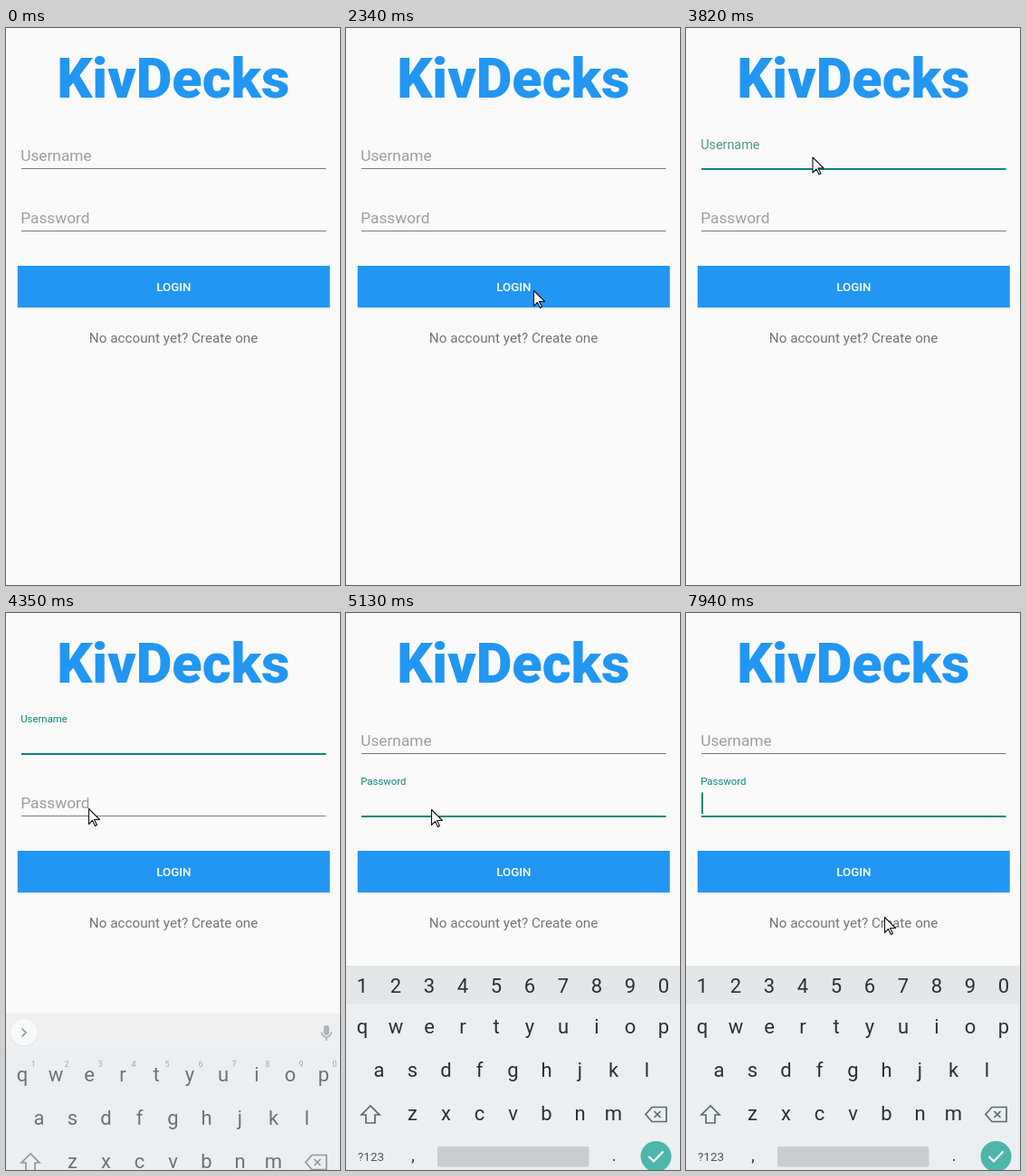
An HTML page for the animation above (8000 ms loop, 369x616 px).

```html
<!DOCTYPE html>
<html lang="en">
<head>
<meta charset="utf-8">
<title>Login screen</title>
<style>
  html, body { margin: 0; height: 100%; overflow: hidden; background: #fafafa; }
  svg { display: block; width: 100%; height: 100%; font-family: Roboto, Arial, sans-serif; }
  .mid { text-anchor: middle; }
  .key { font-size: 22px; fill: #263238; }
  .sup { font-size: 9px; fill: #78868d; }
  .mark { font-size: 18px; fill: #263238; }
  .icon { fill: none; stroke: #5a6a72; stroke-width: 1.7; }
  .mic { stroke: #8b9398; }
</style>
</head>
<body>
<svg viewBox="0 0 369 616">
  <rect width="369" height="616" fill="#fafafa"/>
  <text class="mid" x="184.8" y="77" font-size="61.2" font-weight="900" fill="#2196f3">KivDecks</text>
  <g id="fields"></g>
  <rect x="13" y="264" width="345" height="46.5" fill="#dfe3e6"/>
  <rect x="12.8" y="263" width="344.9" height="46" fill="#2196f3"/>
  <text class="mid" x="185.3" y="291" font-size="13.3" font-weight="500" fill="#fff">LOGIN</text>
  <text class="mid" x="185.1" y="348" font-size="15.25" fill="#757575">No account yet? Create one</text>

  <g id="keyboard">
    <rect y="390" width="369" height="226" fill="#eceff1"/>
    <g id="keys">
      <g id="textKeys">
        <rect y="390" width="369" height="42" fill="#eeeff1"/>
        <circle cx="20" cy="412" r="15" fill="#dfe2e4"/>
        <circle cx="20" cy="411" r="14.5" fill="#fff"/>
        <path class="icon" d="M17.5 406.5l4.5 4.5l-4.5 4.5"/>
        <rect x="351" y="403" width="6" height="11" rx="3" fill="#8b9398"/>
        <path class="icon mic" d="M348.5 410.5a5.5 5.5 0 0 0 11 0M354 416v4"/>
      </g>
      <g id="digitKeys">
        <rect y="390" width="369" height="42" fill="#e3e7e9"/>
      </g>
      <g id="letters"></g>
      <path class="icon" d="M27 545l-10 10h5v9h10v-9h5z"/>
      <path class="icon" d="M338 546.5h16v16h-16l-7 -8zM340.5 551l7 7m0 -7l-7 7"/>
      <text class="mid" x="27.5" y="606" font-size="13.5" fill="#455a64">?123</text>
      <text class="mid mark" x="74" y="606">,</text>
      <text class="mid mark" x="296" y="606">.</text>
    </g>
    <rect x="101" y="590" width="167.5" height="22.5" rx="2" fill="#c9cdd0"/>
    <circle cx="342.5" cy="601" r="17" fill="#4db6ac"/>
    <path id="action" fill="none" stroke="#fff" stroke-width="2.2"/>
  </g>

  <rect id="caret" x="17" y="198.5" width="2" height="23.5" fill="#0a8778"/>
  <path id="cursor" d="M0 0v17l4 -4l3 6l2 -1l-3 -6h6z"
        fill="#fff" stroke="#111" stroke-width="1.1" stroke-linejoin="round"/>
</svg>
<script>
const LOOP = 8000, STEP = 77;
const TEAL = '#0a8778';
const $ = id => document.getElementById(id);

function set(el, attrs) {
  for (const name in attrs) el.setAttribute(name, attrs[name]);
}
function add(parent, tag, attrs, text = '') {
  const el = document.createElementNS('http://www.w3.org/2000/svg', tag);
  set(el, attrs);
  el.textContent = text;
  return parent.appendChild(el);
}
const show = (el, on) => { el.style.display = on ? '' : 'none'; };

function progress(t, start, end) {
  if (t < start) return 0;
  if (t >= end) return 1;
  return Math.floor((t - start) / STEP) * STEP / (end - start);
}
const smooth = p => p * p * (3 - 2 * p);

// Pointer moves: start, end, destination
const moves = [
  [1320, 1710, 207.5, 290.5],
  [2340, 2570, 149, 191],
  [2570, 2840, 214, 325],
  [2840, 3030, 192.5, 333.5],
  [3030, 3330, 140, 143],
  [3820, 4200, 91.5, 216.5],
  [4750, 4980, 94.5, 217.5],
  [5130, 5750, 215.5, 333.5],
  [6140, 6370, 219.5, 336.5]
];

function pointerAt(t) {
  let x = 304, y = 554;
  for (const [start, end, toX, toY] of moves) {
    const p = smooth(progress(t, start, end));
    x += (toX - x) * p;
    y += (toY - y) * p;
  }
  return `${x} ${y}`;
}

function makeField(label, top) {
  return {
    top,
    hint: add($('fields'), 'text', { x: 16.2 }, label),
    line: add($('fields'), 'rect', { x: 17, width: 336.5 })
  };
}

function drawField({ top, hint, line }, lift, focused) {
  set(hint, { y: top - 8 - 26.2 * lift, 'font-size': 17.3 - 5.9 * lift });
  hint.style.fill = `color-mix(in srgb, ${TEAL} ${lift * 100}%, #9e9e9e)`;
  set(line, { y: top, height: focused ? 2 : 1, fill: focused ? TEAL : '#7b7b7b' });
}

function makeRow(parent, chars, x, y, cls = 'key') {
  [...chars].forEach((c, i) => add(parent, 'text', { class: 'mid ' + cls, x: x + 37 * i, y }, c));
}
['qwertyuiop', 'asdfghjkl', 'zxcvbnm'].forEach((row, i) =>
  makeRow($('letters'), row, 18 + 18.5 * i * (i + 1) / 2, 465 + 48 * i));
makeRow($('digitKeys'), '1234567890', 18, 420);
makeRow($('textKeys'), '1234567890', 30, 449, 'sup');

const user = makeField('Username', 155);
const pass = makeField('Password', 224);

function draw(t) {
  const swap = progress(t, 4750 - STEP, 4980);
  const userLift = 0.25 * progress(t, 3500 - STEP, 3570) + 0.75 * progress(t, 3820 - STEP, 3980);
  const passLift = 0.2 * progress(t, 4350, 4580);
  drawField(user, userLift * (1 - swap), t >= 3500 && t < 4750);
  drawField(pass, passLift + (1 - passLift) * swap, t >= 4350 + STEP);

  const rise = progress(t, 4350, 4580);
  const numeric = t >= 4750;
  show($('keyboard'), t >= 4350);
  set($('keyboard'), { transform: `translate(0 ${53 * (1 - rise) ** 2})` });
  set($('keys'), { opacity: 0.65 + 0.35 * rise });
  show($('digitKeys'), numeric);
  show($('textKeys'), !numeric);
  set($('action'), {
    d: numeric ? 'M334.5 601l5.5 5.5l10.5 -11' : 'M334 601h13m-5 -5l5 5l-5 5M350.5 595v12'
  });

  show($('caret'), (t >= 5590 && t < 6140) || t >= 7000);
  show($('cursor'), t >= 1320);
  set($('cursor'), { transform: `translate(${pointerAt(t)})` });
}

function frame() {
  draw(performance.now() % LOOP);
  requestAnimationFrame(frame);
}
frame();
</script>
</body>
</html>
```
